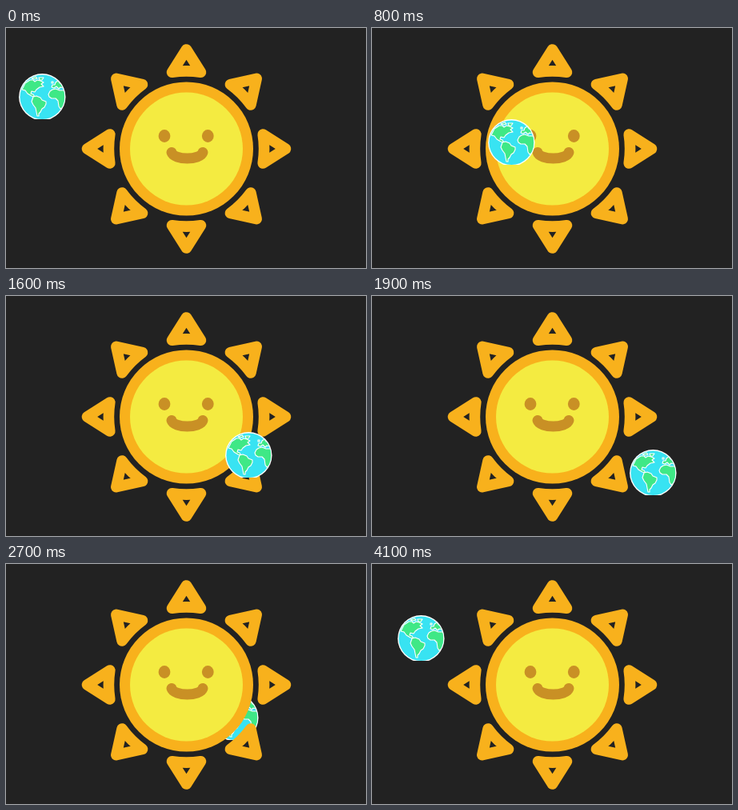
These frames come from a looping animation (450x300 px, 4.2 s). An HTML page with a canvas:

```html
<!DOCTYPE html>
<html lang="en">
<head>
<meta charset="utf-8">
<title>Earth and Sun</title>
<style>
  html, body { margin: 0; width: 100%; height: 100%; overflow: hidden; background: #222; }
  canvas { display: block; }
</style>
</head>
<body>
<canvas id="stage" width="450" height="300"></canvas>
<script>
const ctx = document.getElementById('stage').getContext('2d');
const TAU = Math.PI * 2;
const STEP = 100, STEPS = 42, HALF = STEPS / 2;
const ORANGE = '#f8b11c', YELLOW = '#f4eb41', BROWN = '#c99025';
const SEA = '#38e3f2', LAND = '#3fe886';

const coasts = [
  // North and Central America
  'M4 20 L8 12 L14 8 L18 8 L20 10 L23 8 L27 9 L31 11 L28 13 L31 16 L26 17 L22 20 L20 23 L16 22 L15 25 L18 26 L20 29 L16 28 L11 25 L8 21 Z',
  // Arctic islands
  'M16 6 L21 4 L23 6 L19 7 Z M25 5 L31 5 L29 8 L26 8 Z',
  // South America
  'M18 29 L22 28 L27 30 L29 33 L34 35 L34 38 L32 42 L29 44 L27 48 L25 50 L25 53 L23 53 L22 48 L21 43 L18 39 L16 35 Z',
  // Europe
  'M41 17 L42 14 L45 14 L46 11 L49 9 L51 12 L54 13 L56 18 L52 17 L50 19 L47 16 L44 18 Z',
  'M41 10 L43 10 L43 12 L41 12 Z',
  // Africa
  'M37 26 L39 22 L42 20 L46 19 L51 21 L59 21 L59 36 L55 42 L52 44 L50 41 L49 34 L46 31 L41 31 L38 29 Z'
].map(d => new Path2D(d));

const ray = new Path2D('M0 -124 L18 -95.7 Q0 -98.5 -18 -95.7 Z');
const smile = new Path2D('M207 155.5 C210 165.5 243 165.5 246 155.5');

function ellipse(x, y, rx, ry, color) {
  ctx.beginPath();
  ctx.ellipse(x, y, rx, ry, 0, 0, TAU);
  ctx.fillStyle = color;
  ctx.fill();
}

function stroke(path, width, color) {
  ctx.lineWidth = width;
  ctx.strokeStyle = color;
  ctx.stroke(path);
}

function drawSun() {
  const x = 225.5, y = 151;
  for (let i = 0; i < 8; i++) {
    ctx.save();
    ctx.translate(x, y);
    ctx.rotate(i * TAU / 8);
    stroke(ray, 13.6, ORANGE);
    ctx.restore();
  }
  ellipse(x, y, 83.5, 83.5, ORANGE);
  ellipse(x, y, 70.5, 70.5, YELLOW);
  ellipse(198, 135, 7.4, 7.9, BROWN);
  ellipse(252.3, 135, 7.4, 7.9, BROWN);
  stroke(smile, 13, BROWN);
}

function drawEarth(x, y) {
  ctx.save();
  ctx.translate(x, y);
  // the globe is trimmed slightly flat at the bottom
  ctx.beginPath();
  ctx.rect(0, 0, 59, 57);
  ctx.clip();
  ellipse(29.3, 29.2, 29.2, 29.2, '#fff');
  ellipse(29.3, 29.2, 27.8, 27.8, SEA);
  ctx.clip();
  for (const land of coasts) {
    ctx.fillStyle = LAND;
    ctx.fill(land);
    stroke(land, 1.1, '#fff');
  }
  ctx.restore();
}

function draw(time) {
  const step = Math.floor(time / STEP) % STEPS;
  const k = step <= HALF ? step : STEPS - step;
  const x = Math.round(15.95 + 16.1 * k);
  const y = Math.round(57.2 + 7.08 * k);
  const inFront = step <= HALF;

  ctx.fillStyle = '#222';
  ctx.fillRect(0, 0, 450, 300);
  if (!inFront) drawEarth(x, y);
  drawSun();
  if (inFront) drawEarth(x, y);
}

ctx.lineCap = ctx.lineJoin = 'round';
const start = performance.now();
function tick() {
  draw(performance.now() - start);
  requestAnimationFrame(tick);
}
tick();
</script>
</body>
</html>
```
